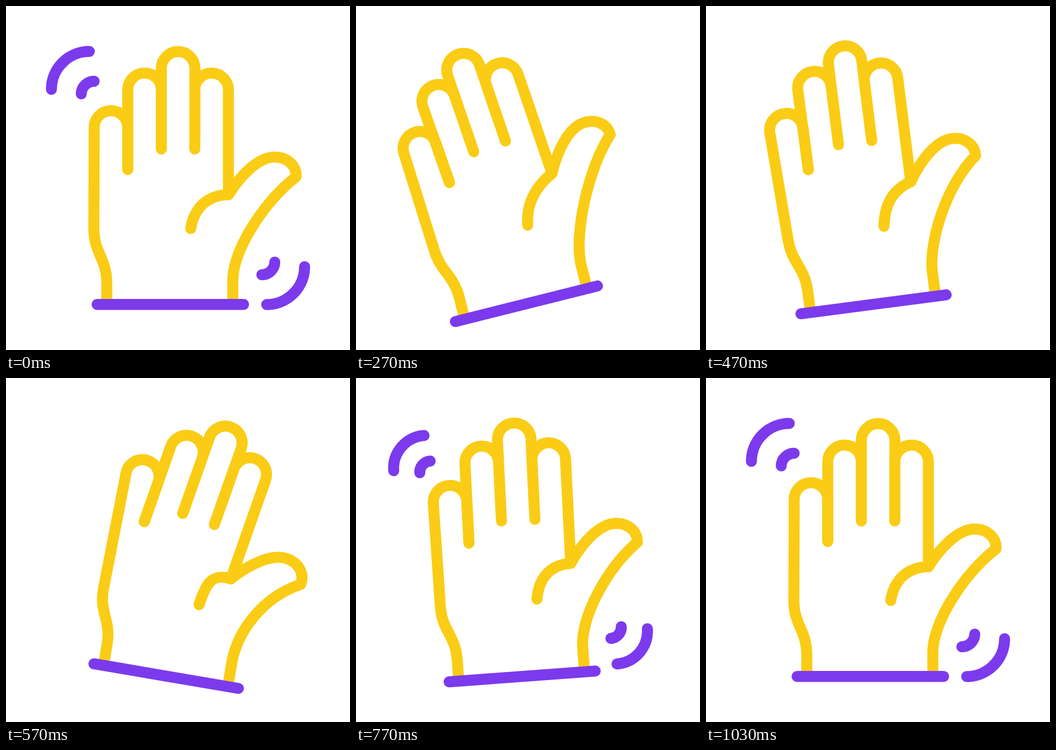
These frames come from a looping animation (640x640 px, 1.67 s). An HTML page:

```html
<!DOCTYPE html>
<html lang="en">
<head>
<meta charset="utf-8">
<title>Waving hand</title>
<style>
  html, body { margin: 0; width: 100%; height: 100%; overflow: hidden; background: #fff; }
  svg { display: block; width: 100%; height: 100%; }
  path { fill: none; stroke: #7c3aed; stroke-width: 20.5; stroke-linecap: round; stroke-linejoin: round; }
  #hand path { stroke: #facc15; }
</style>
</head>
<body>
<svg viewBox="0 0 640 640">
  <g id="wave">
    <g id="hand">
      <path id="outline"/>
      <path id="slots"/>
      <path id="crease"/>
    </g>
    <path d="M169.5 555.3H442"/>
    <path id="upperArcs"/>
    <path id="lowerArcs" transform="rotate(180 320 320)"/>
  </g>
</svg>
<script>
const LOOP = 1670;
const PIVOT = [306, 509];
const FINGER_ORIGIN = [289, 266];
const ARC_ORIGIN = [167, 163];

// Tracks are [frame, value] keys at 30 frames per second.
const TILT = [[4, 0], [10.5, -21], [11, -21], [17.6, 10.4], [24.2, -5.6], [31, 0]];
const LEAN_LEFT = [[4, 0], [10.5, 1], [11, 1], [17.6, 0]];
const LEAN_RIGHT = [[11, 0], [17.6, 1], [24.6, 0]];
const ARC_DRIFT = [[0, 0], [8, 1]];
const ARC_GROWTH = [[17.6, 0], [24.6, 1]];
const ARCS_HIDDEN_FROM = 6;

const LEFT_POSE = { angle: -7.2, x: -14.2, y: -13 };
const RIGHT_POSE = { angle: 10.1, x: -3.4, y: -14.2 };

const el = id => document.getElementById(id);
const ease = t => t * t * (3 - 2 * t);
const fmt = (x, y) => `${x.toFixed(2)} ${y.toFixed(2)} `;

function sample(keys, frame) {
  if (frame <= keys[0][0]) return keys[0][1];
  for (let i = 1; i < keys.length; i++) {
    const [start, from] = keys[i - 1], [end, to] = keys[i];
    if (frame < end) return from + (to - from) * ease((frame - start) / (end - start));
  }
  return keys[keys.length - 1][1];
}

// Returns a function that places a finger point in the leaning pose.
function fingerPose(left, right) {
  const mix = key => LEFT_POSE[key] * left + RIGHT_POSE[key] * right;
  const angle = mix('angle') * Math.PI / 180;
  const cos = Math.cos(angle), sin = Math.sin(angle);
  const [ox, oy] = FINGER_ORIGIN;
  const x0 = ox + mix('x'), y0 = oy + mix('y');
  return (x, y) => fmt(x0 + (x - ox) * cos - (y - oy) * sin,
                       y0 + (x - ox) * sin + (y - oy) * cos);
}

function drawHand(left, right) {
  const p = fingerPose(left, right);
  const pinky = (x, y) => p(x + 1.7 * left, y + 2 * left);
  const arch = (x, y, place = p) =>
    `L${place(x, y)}A31.25 31.25 0 0 1 ${place(x + 62.5, y)}`;
  const wristBend = 163.5 + 2.5 * left - right;
  el('outline').setAttribute('d',
    `M187.5 555V515C187.5 470 ${wristBend} 459 163.5 415` +
    arch(164, 226, pinky) + `L${pinky(226.5, 304)}` +
    `M${p(413.8, 351)}C${p(437, 314)}${p(470, 281)}${p(500, 281)}` +
    `C${p(523, 281)}${p(541, 297)}${p(539.5, 318)}` +
    `C${p(478, 366)}422 455 422 510V555`);
  el('slots').setAttribute('d',
    `M${pinky(226.5, 304)}${arch(226.5, 156)}L${p(289, 266)}` +
    `${arch(289, 116)}L${p(351.3, 266)}` +
    `${arch(351.3, 156)}L${p(413.8, 351)}`);
  el('crease').setAttribute('d',
    `M343.7 414C350 375 ${p(375 + 4 * left, 352 + 18 * left)}${p(413.8, 351)}`);
}

function arcsPath(scale, dx, dy) {
  const [ox, oy] = ARC_ORIGIN;
  const at = (x, y) => fmt(ox + (x - ox) * scale + dx, oy + (y - oy) * scale + dy);
  const arc = (x1, y1, x2, y2, r) =>
    `M${at(x1, y1)}A${r * scale} ${r * scale} 0 0 1 ${at(x2, y2)}`;
  return arc(84.5, 155, 155, 84.5, 70.5) + arc(140, 163.5, 164, 140, 24);
}

function drawArcs(frame) {
  const leaving = frame < ARCS_HIDDEN_FROM;
  const scale = leaving ? 1 : sample(ARC_GROWTH, frame);
  const drift = leaving ? sample(ARC_DRIFT, frame) : 0;
  const path = (dx, dy) => scale > 0 ? arcsPath(scale, dx * drift, dy * drift) : '';
  el('upperArcs').setAttribute('d', path(-46, -42));
  el('lowerArcs').setAttribute('d', path(-64, -54));
}

function render(ms) {
  const frame = Math.floor(Math.floor(ms % LOOP / 10) * 0.3 + 0.15);
  el('wave').setAttribute('transform', `rotate(${sample(TILT, frame)} ${PIVOT.join(' ')})`);
  drawHand(sample(LEAN_LEFT, frame), sample(LEAN_RIGHT, frame));
  drawArcs(frame);
}

const start = performance.now();
function tick() {
  render(performance.now() - start);
  requestAnimationFrame(tick);
}
tick();
</script>
</body>
</html>
```
